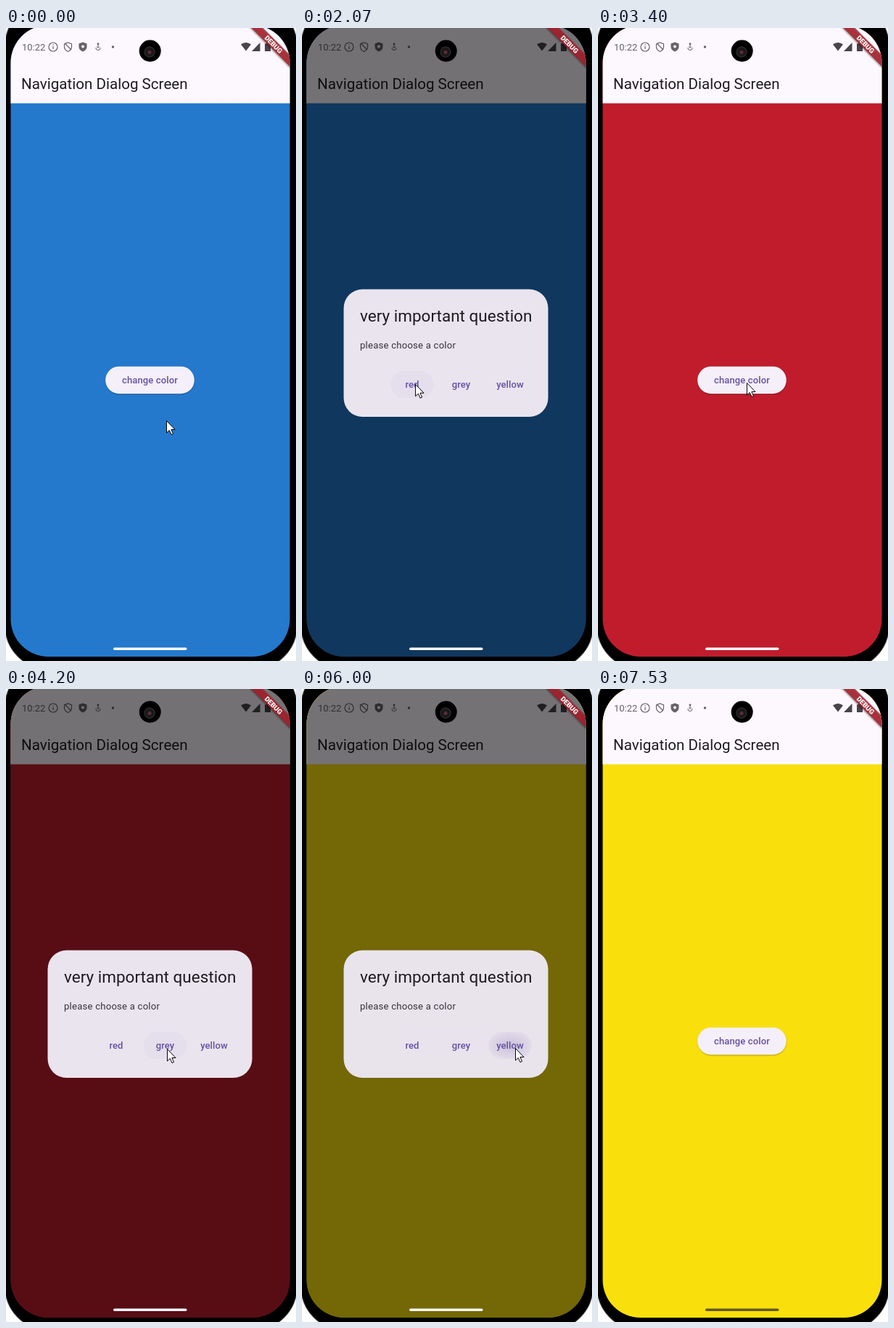
These frames come from a looping animation (400x871 px, 7.6 s). An HTML page:

```html
<!DOCTYPE html>
<html lang="en">
<head>
<meta charset="utf-8">
<title>Navigation Dialog Screen</title>
<style>
  html, body { margin: 0; width: 100%; height: 100%; overflow: hidden; background: #fff; }
  svg { display: block; width: 400px; height: 871px; font-family: Roboto, sans-serif; }
  .label { font-size: 13.1px; font-weight: 500; letter-spacing: .09px; fill: #6552a2; text-anchor: middle; }
</style>
</head>
<body>
<svg viewBox="0 0 400 871">
  <defs>
    <clipPath id="screen"><rect x="6.500" y="-4" width="385" height="869" rx="52"/></clipPath>
    <radialGradient id="glow">
      <stop offset="0" stop-color="#6750a4" stop-opacity=".2"/>
      <stop offset="1" stop-color="#6750a4" stop-opacity=".02"/>
    </radialGradient>
    <filter id="soft" x="-20%" y="-60%" width="140%" height="220%"><feGaussianBlur stdDeviation=".8"/></filter>
  </defs>

  <rect x="-2" y="-36" width="404" height="919" rx="62" stroke="#555"/>

  <g clip-path="url(#screen)">
    <rect id="page" width="400" height="871"/>
    <rect width="400" height="103.600" fill="#fdf7fe"/>
    <text x="21" y="84" font-size="20.6" fill="#1d1b20">Navigation Dialog Screen</text>

    <g fill="#656268">
      <text x="22" y="30.5" font-size="13">10:22</text>
      <g fill="none" stroke="#656268" stroke-width="1.2">
        <circle cx="65" cy="26" r="6"/>
        <path d="M65 25v4M65 22.4v1.4M85.500 20l5 2v4q0 4-5 6.500q-5-2.500-5-6.500v-4zM81 21l9 9"/>
        <path stroke-width="1" d="M127 22v5M125 25.500l2 2 2-2M123.800 27q0 3.500 3.200 3.500t3.200-3.500"/>
      </g>
      <path d="M106 19.500l5.500 2v4.500q0 4-5.500 6.500q-5.500-2.500-5.500-6.500v-4.500z"/>
      <circle cx="106" cy="25.500" r="2" fill="#fdf7fe"/>
      <circle cx="127" cy="22" r="1.400"/>
      <circle cx="147.500" cy="26" r="1.700"/>
      <g fill="#47444a">
        <path d="M324 22.500q7-5 14 0l-7 9zM339 32h11.500v-12zM357 21.500h2v-1.500h4v1.500h2v10.500h-8z"/>
      </g>
    </g>

    <rect x="138" y="467" width="121.500" height="37" rx="18.500" opacity=".35" filter="url(#soft)"/>
    <rect x="137.200" y="465.700" width="122.600" height="37.500" rx="18.700" fill="#f5eff9"/>
    <text class="label" x="198.500" y="489.300">change color</text>

    <rect id="barrier" width="400" height="871"/>
    <g id="dialog">
      <rect x="57.500" y="359.500" width="282" height="175.500" rx="26" fill="#eae4ee"/>
      <text x="80" y="404.300" font-size="22.5" fill="#1d1b20">very important question</text>
      <text x="80" y="440.500" font-size="13.1" letter-spacing=".23" fill="#353239">please choose a color</text>
      <rect id="hover" y="472" width="59" height="37" rx="18.500" fill="#6750a4" fill-opacity=".04"/>
      <rect id="ripple" y="472" width="59" height="37" rx="18.500" fill="url(#glow)"/>
      <text class="label" x="152" y="495">red</text>
      <text class="label" x="219.500" y="495">grey</text>
      <text class="label" x="287" y="495">yellow</text>
    </g>

    <rect id="handle" x="148" y="852.500" width="101.500" height="3.500" rx="1.750"/>
    <g transform="translate(391.500 0) rotate(45)">
      <rect x="-40" y="27" width="80" height="11.500" opacity=".5" filter="url(#soft)"/>
      <rect x="-40" y="26.200" width="80" height="11.300" fill="#b2202c" fill-opacity=".8"/>
      <text y="35.200" font-size="9.5" font-weight="900" fill="#fff" text-anchor="middle">DEBUG</text>
    </g>
  </g>

  <circle cx="198.700" cy="31.500" r="15"/>
  <circle cx="198" cy="33" r="7" fill="#1c1719" stroke="#2a282b" stroke-width="1.500"/>
  <circle cx="198" cy="33.500" r="2.500" fill="#552f37"/>

  <path id="cursor" d="M0 0V16.500L3.800 13 6.500 19 9 17.900 6.400 12H11.500Z" fill="#fff" stroke="#000" stroke-linejoin="round"/>
</svg>
<script>
const LOOP = 7600, STEP = 200 / 3, FADE = 150;
const el = id => document.getElementById(id);
const clamp = v => Math.max(0, Math.min(1, v));

// each dialog: opening time, closing time, chosen page colour, centre of the chosen option
const dialogs = [
  { open: 1480, close: 2447, color: '#c01c2c', x: 152 },
  { open: 3400, close: 5034, color: '#455a64', x: 219.5 },
  { open: 5400, close: 5990, color: '#f9e00c', x: 287 }
];

// time, x, y of the pointer tip
const path = [
  [0, 221.5, 540.5], [400, 221.5, 540.5], [1100, 198.5, 488.5], [1600, 198.5, 488.5],
  [2200, 150.5, 490.5], [2600, 150.5, 490.5], [3200, 205.5, 488.5], [3550, 205.5, 488.5],
  [4050, 222.5, 495.5], [4300, 222.5, 495.5], [4800, 219.5, 499.5], [5450, 219.5, 499.5],
  [5850, 294.5, 494.5], [6200, 294.5, 494.5], [6900, 188.5, 472.5], [7200, 188.5, 472.5],
  [7470, 412, 6], [LOOP, 412, 6]
];

function bezier(x1, y1, x2, y2) {
  const at = (a, b, s) => 3 * a * s * (1 - s) ** 2 + 3 * b * s * s * (1 - s) + s ** 3;
  return x => {
    let lo = 0, hi = 1;
    for (let i = 0; i < 20; i++) {
      const mid = (lo + hi) / 2;
      if (at(x1, x2, mid) < x) lo = mid; else hi = mid;
    }
    return at(y1, y2, lo);
  };
}
const ease = bezier(.25, .1, .25, 1);
const easeOut = bezier(0, 0, .58, 1);

function pointer(t) {
  const i = path.findIndex(p => p[0] > t);
  const [t0, x0, y0] = path[i - 1], [t1, x1, y1] = path[i];
  const k = (t - t0) / (t1 - t0), s = k * k * (3 - 2 * k);
  return [x0 + (x1 - x0) * s, y0 + (y1 - y0) * s];
}

function draw(t) {
  let color = '#2479cd', shown = 0, press = 0, rippleX = 0;
  for (const d of dialogs) {
    if (t >= d.close) color = d.color;
    shown = Math.max(shown, Math.min(clamp((t - d.open) / FADE), 1 - clamp((t - d.close) / FADE)));
    if (t >= d.close - 70 && t < d.close + FADE) {
      press = 1 - clamp((t - d.close - 20) / 130);
      rippleX = d.x;
    }
  }
  const [x, y] = pointer(t);
  const over = dialogs.find(d => Math.abs(x + 2 - d.x) < 30 && y > 472 && y < 499);

  el('page').setAttribute('fill', color);
  el('barrier').setAttribute('opacity', .54 * ease(shown));
  el('dialog').setAttribute('opacity', shown ? easeOut(shown) : 0);
  el('hover').setAttribute('x', over ? over.x - 29.5 : -100);
  el('ripple').setAttribute('x', rippleX - 29.5);
  el('ripple').setAttribute('opacity', press);
  el('handle').setAttribute('fill', t > 6200 ? '#645908' : '#f7f6fa');
  el('cursor').setAttribute('transform', `translate(${x} ${y})`);
}

const start = performance.now();
function tick() {
  const t = (performance.now() - start) % LOOP;
  draw(Math.min(Math.floor((t + 4) / STEP) * STEP, LOOP - 1));
  requestAnimationFrame(tick);
}
tick();
</script>
</body>
</html>
```
